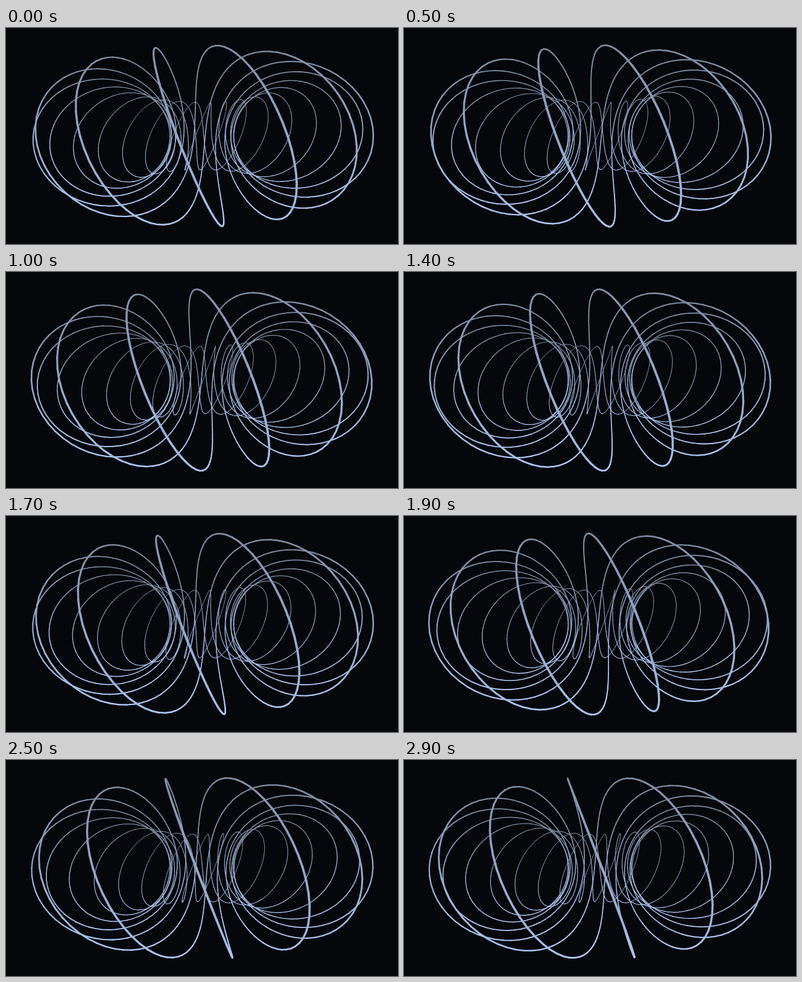
These frames come from a looping animation (650x360 px, 3 s). An HTML page with a canvas:

```html
<!DOCTYPE html>
<html lang="en">
<head>
<meta charset="utf-8">
<title>Torus coil</title>
<style>
html, body { margin: 0; width: 100%; height: 100%; overflow: hidden; background: #05070b; }
canvas { display: block; }
</style>
</head>
<body>
<canvas id="stage" width="650" height="360"></canvas>
<script>
const ctx = document.getElementById('stage').getContext('2d');
const TAU = Math.PI * 2;
const LOOP = 3000, STEP = 100;
const RING = 5, TUBE = 3, DISTANCE = 11.84, FOCAL = 310, THICKNESS = 0.051;
const COILS = 21, WINDINGS = 7, SEGMENTS = 64, START = 0.2345;
const TOP = [122, 136, 158], BOTTOM = [174, 202, 248];

// Point on the coil: angle around the tube and around the ring, in perspective.
function project(tube, ring) {
  const radius = RING + TUBE * Math.cos(tube);
  const scale = FOCAL / (DISTANCE - radius * Math.cos(ring));
  return {
    x: 325 + radius * Math.sin(ring) * scale,
    y: 180 - TUBE * Math.sin(tube) * scale,
    scale
  };
}

function shade(tube) {
  const mix = (1 - Math.sin(tube)) / 2;
  return `rgb(${TOP.map((c, i) => Math.round(c + (BOTTOM[i] - c) * mix))})`;
}

function draw(time) {
  const turn = START - TAU / 3 * time / LOOP;
  const pieces = [];
  for (let coil = 0; coil < COILS; coil++) {
    let from = null;
    for (let i = 0; i <= SEGMENTS; i++) {
      const tube = TAU * i / SEGMENTS;
      const to = project(tube, turn + TAU * coil / COILS - tube / WINDINGS);
      if (from) pieces.push({ from, to, color: shade(tube) });
      from = to;
    }
  }
  pieces.sort((a, b) => a.to.scale - b.to.scale);

  ctx.fillStyle = '#05070b';
  ctx.fillRect(0, 0, 650, 360);
  ctx.lineCap = 'round';
  for (const { from, to, color } of pieces) {
    ctx.strokeStyle = color;
    ctx.lineWidth = THICKNESS * to.scale;
    ctx.beginPath();
    ctx.moveTo(from.x, from.y);
    ctx.lineTo(to.x, to.y);
    ctx.stroke();
  }
}

let shown = -1;
function tick() {
  const step = Math.floor(performance.now() % LOOP / STEP);
  if (step !== shown) draw((shown = step) * STEP);
  requestAnimationFrame(tick);
}
tick();
</script>
</body>
</html>
```
